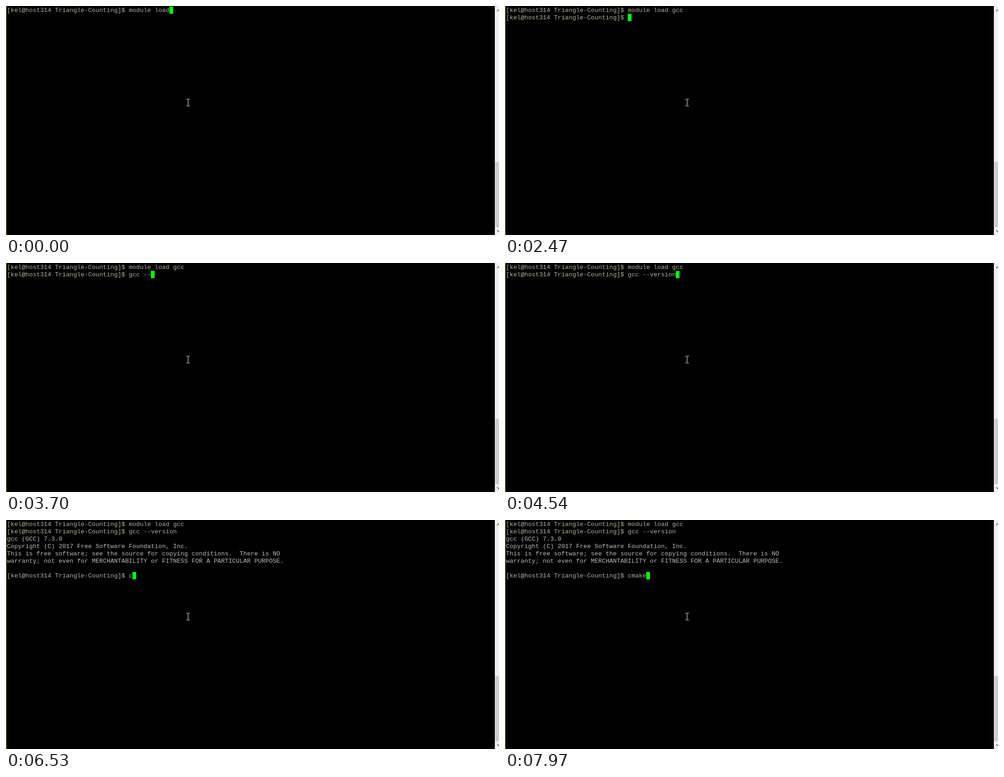
An HTML page that plays this animation: 1068x498 px, repeating every 8000 ms.

```html
<!DOCTYPE html>
<html lang="en">
<head>
<meta charset="utf-8">
<title>Terminal</title>
<style>
  html, body { margin: 0; width: 100%; height: 100%; overflow: hidden; background: #000; }
  #stage { position: relative; width: 1068px; height: 498px; overflow: hidden; background: #000; }
  #screen {
    position: absolute; left: 2px; top: 2px;
    font: 13.333px/16px "Liberation Mono", "Courier New", monospace;
    color: #bbb; white-space: pre;
  }
  .row { height: 16px; }
  .shell { color: #bbb09c; }
  #cursor { position: absolute; width: 8px; height: 16px; background: #0f0; }
  svg { position: absolute; left: 0; top: 0; }
</style>
</head>
<body>
<div id="stage">
  <div id="screen"></div>
  <div id="cursor"></div>
  <svg width="1068" height="498" shape-rendering="crispEdges">
    <rect width="1" height="498" fill="#80b62c"/>
    <rect x="1059" width="9" height="498" fill="#f0f0f0"/>
    <rect x="1060" y="339" width="8" height="142" fill="#cdcdcd"/>
    <path d="M1064 11.5l4.5-4.5M1064 487.5l4.5 4.5" fill="none" stroke="#505050"
      stroke-width="1.6" shape-rendering="auto"/>
    <path d="M391 202h3v1h1v-1h3v1h-3v14h3v1h-3v-1h-1v1h-3v-1h3v-14h-3z" fill="#fff"/>
  </svg>
</div>
<script>
const LOOP = 8000, KEY_GAP = 137, CELL_W = 8, CELL_H = 16;
const PROMPT = "[kel@host314 Triangle-Counting]$ ";
const VERSION_INFO = `gcc (GCC) 7.3.0
Copyright (C) 2017 Free Software Foundation, Inc.
This is free software; see the source for copying conditions.  There is NO
warranty; not even for MERCHANTABILITY or FITNESS FOR A PARTICULAR PURPOSE.
`;

// Each state holds the full screen text from its time on.
const states = [];
let text = "";

function set(at, next) {
  text = next;
  states.push({ at, text });
}
const print = (at, more) => set(at, text + more);

// Bars separate the keys that land on successive beats.
const type = (at, keys) =>
  keys.split("|").forEach((key, i) => print(at + i * KEY_GAP, key));

function erase(at, count) {
  for (let i = 0; i < count; i++) set(at + i * KEY_GAP, text.slice(0, -1));
}

print(0, PROMPT + "module load");
type(120, " ");
type(680, "g");
type(930, "c|c");
print(1200, "\n");
print(2470, PROMPT);
type(2880, "g");
type(3150, "c|c| |-|-");
type(3980, "ve|r|s|i|on");
print(4810, "\n" + VERSION_INFO + "\n" + PROMPT);
type(6530, "c|d");
erase(7050, 2);
type(7660, "cm|ak|e");

const screen = document.getElementById("screen");
const cursor = document.getElementById("cursor");
let shown = null;

function show(state) {
  const lines = state.text.split("\n");
  screen.replaceChildren(...lines.map(line => {
    const row = document.createElement("div");
    row.className = line.startsWith(PROMPT) ? "row shell" : "row";
    row.textContent = line;
    return row;
  }));
  cursor.style.left = 2 + lines.at(-1).length * CELL_W + "px";
  cursor.style.top = 1 + (lines.length - 1) * CELL_H + "px";
  shown = state;
}

const start = performance.now();

function tick() {
  const t = (performance.now() - start) % LOOP;
  const state = states.findLast(s => s.at <= t);
  if (state !== shown) show(state);
  requestAnimationFrame(tick);
}
tick();
</script>
</body>
</html>
```
